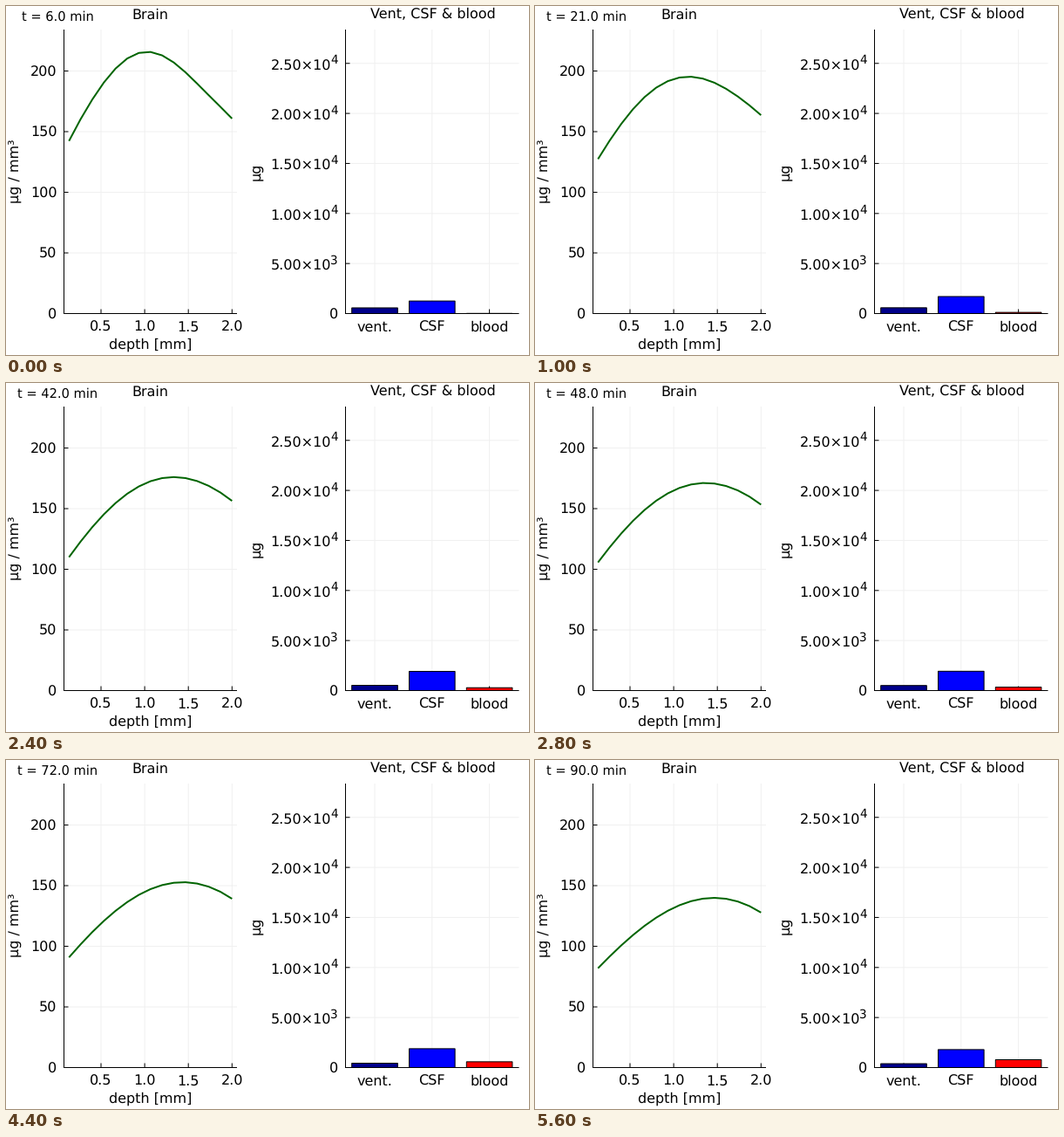
These frames come from a looping animation (600x400 px, 5.8 s). A matplotlib script:

```python
import matplotlib.pyplot as plt
import numpy as np
from matplotlib.animation import FuncAnimation
from matplotlib.patches import Rectangle

W, H, DPI = 600, 400, 100
FRAMES, STEP_MS = 29, 200
PX = 72 / DPI
TOP, BASE = 27, 352.5

plt.rcParams["font.family"] = "DejaVu Sans"
plt.rcParams["text.hinting"] = "no_hinting"
fig = plt.figure(figsize=(W / DPI, H / DPI), dpi=DPI, facecolor="white")
ax = fig.add_axes([0, 0, 1, 1])
ax.set_xlim(0, W)
ax.set_ylim(H, 0)
ax.axis("off")


def line(xs, ys, color="black", width=1, z=2):
    return ax.plot(xs, ys, color=color, lw=width * PX, zorder=z, snap=False,
                   solid_capstyle="butt", solid_joinstyle="round")[0]


def label(x, y, s, size=16, ha="center", rot=0):
    return ax.text(x, y, s, fontsize=size * PX, ha=ha, va="baseline",
                   rotation=rot, rotation_mode="anchor", zorder=5)


def panel(left, right, xticks, yticks):
    for x in xticks:
        line([x, x], [TOP, BASE], "#f0f0f0", 1, 1)
        line([x, x], [BASE, BASE - 5])
    for y in yticks:
        line([left, right], [y, y], "#f0f0f0", 1, 1)
        line([left, left + 5], [y, y])
    line([left, left], [TOP, BASE + 0.5])
    line([left - 0.5, right], [BASE, BASE])


# Concentration through the tissue
def depth_px(d):
    return 259.3 + (d - 2) * 100.2


def conc_px(c):
    return BASE - c * 1.39


depths = np.arange(0.5, 2.1, 0.5)
levels = np.arange(0, 201, 50)
panel(66.5, 265, depth_px(depths), conc_px(levels))
for d in depths:
    label(depth_px(d), 372.3, f"{d:.1f}")
for c in levels:
    label(58.5, conc_px(c) + 5.8, str(c), ha="right")
label(165.5, 14.3, "Brain")
label(166, 393, "depth [mm]")
label(16, 189.5, "µg / mm³", rot=90)
clock = label(59, 17, "", 14.67)

# Amounts in the compartments
UG = 57.35 / 5000
centers = 423 + 65.8 * np.arange(3)
amounts = np.arange(0, 25001, 5000)
panel(389.5, 588.5, centers, BASE - amounts * UG)
for x, name in zip(centers, ("vent.", "CSF", "blood")):
    label(x, 372.3, name)
for a in amounts:
    y = BASE - a * UG
    if a == 0:
        label(381.5, y + 5.8, "0", ha="right")
        continue
    power = int(np.floor(np.log10(a)))
    label(373, y + 7.8, f"{a / 10 ** power:.2f}×10", ha="right")
    label(372.4, y + 0.5, str(power), 13.5, ha="left")
label(489.4, 14.3, "Vent, CSF & blood")
label(292.5, 189.5, "µg", rot=90)

# Diffusion with a slow drift between two relaxing edges
CELLS = np.arange(15)
SPREAD, DRIFT = 0.49, 0.026  # cells² and cells per minute
MIN_PER_FRAME, SUBSTEPS = 3, 12


def inner_edge(t):
    return 38 + 104.3 * np.exp(-0.0103 * t)


def outer_edge(t):
    return 182.6 - 0.65 * t - 21.8 * np.exp(-t / 17.5)


def start_profile():
    keys = [142.3, 176.5, 202.0, 215.0, 212.8, 199.0, 180.0, 160.8]
    return np.polyval(np.polyfit(CELLS[::2] / 14, keys, 6), CELLS / 14)


def simulate():
    c, dt = start_profile(), MIN_PER_FRAME / SUBSTEPS
    states = [c.copy()]
    for n in range(1, (FRAMES - 1) * SUBSTEPS + 1):
        bend = c[2:] - 2 * c[1:-1] + c[:-2]
        slope = (c[2:] - c[:-2]) / 2
        c[1:-1] += dt * (SPREAD * bend - DRIFT * slope)
        c[0], c[-1] = inner_edge(n * dt), outer_edge(n * dt)
        if n % SUBSTEPS == 0:
            states.append(c.copy())
    return states


def compartments(t):
    vent = 660 * np.exp(-0.0063 * t) - 90 * np.exp(-t / 10)
    csf = 2577 * np.exp(-0.004 * t) - 1322 * np.exp(-t / 25)
    blood = 17 + 6.2 * t + 0.035 * t ** 2
    return vent, csf, blood


states = simulate()
curve = line(depth_px((CELLS + 1) * 2 / 15), conc_px(states[0]), "#006400", 2, 3)
bars = [ax.add_patch(Rectangle((x - 26.3, BASE), 52.6, 0, fc=color, ec="black",
                               lw=PX, zorder=4, snap=False))
        for x, color in zip(centers, ("#00008b", "#0000ff", "#ff0000"))]


def update(i):
    t = MIN_PER_FRAME * i
    clock.set_text(f"t = {6 + t:.1f} min")
    curve.set_ydata(conc_px(states[i]))
    for bar, a in zip(bars, compartments(t)):
        bar.set_height(-a * UG)
    return [clock, curve, *bars]


anim = FuncAnimation(fig, update, frames=FRAMES, interval=STEP_MS,
                     repeat=True, repeat_delay=0, blit=False)
plt.show()
```
